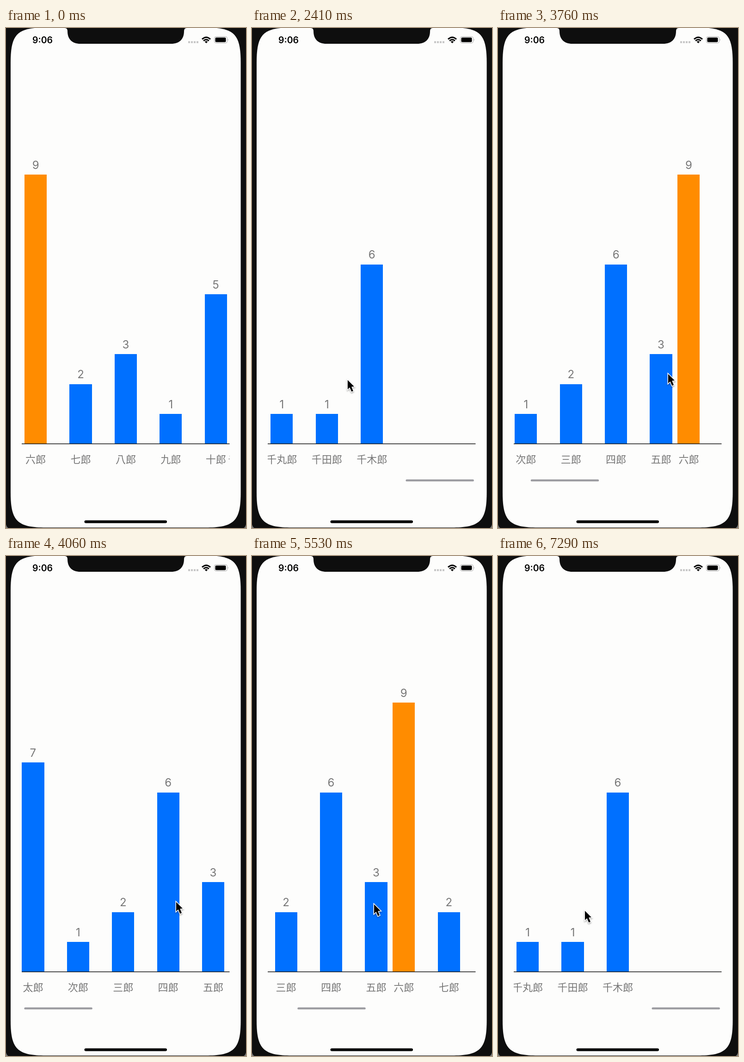
Animation, 519 px wide and 1078 px high, one loop 7340 ms. Source, as an HTML page:

```html
<!DOCTYPE html>
<html lang="ja">
<head>
<meta charset="utf-8">
<style>
  html, body { margin: 0; height: 100%; overflow: hidden; background: #0e0e0e; }
  svg { display: block; width: 519px; height: 1078px; }
  text { font-family: Inter, Roboto, sans-serif; }
  #chart text { fill: #777; font-size: 24px; text-anchor: middle; }
  #chart .name { font: 300 22px "Noto Sans CJK JP", "Noto Sans CJK", sans-serif; }
  #chart rect { shape-rendering: crispEdges; }
</style>
</head>
<body>
<svg viewBox="0 0 519 1078">
  <clipPath id="plot"><rect x="34" y="0" width="449.5" height="960"/></clipPath>
  <path d="M0 1070Q1 1075 5 1078H0ZM519 1070Q518 1075 514 1078H519Z" fill="#777"/>
  <path d="M10 75C10 13 24 -1 86 -1H431.6C493.6 -1 507.6 13 507.6 75V1001C507.6 1063 493.6 1077 431.6 1077H86C24 1077 10 1063 10 1001Z" fill="#fdfdfc"/>
  <path d="M127 0Q133 0 133 7C133 24 143 34 161 34H357C375 34 385 24 385 7Q385 0 391 0Z" fill="#0e0e0e"/>

  <text x="57" y="33" font-size="19.5" font-weight="600">9:06</text>
  <path d="M394 30.5H416" stroke="#c4c4c4" stroke-width="4" stroke-dasharray="4 2"/>
  <g fill="none" stroke="#000" stroke-width="3">
    <path d="M424 24.2Q433 15.8 442 24.2M427.2 27.6Q433 22.4 438.8 27.6"/>
    <path d="M429.7 29.6Q433 26.8 436.3 29.6L433 33Z" fill="#000" stroke="none"/>
  </g>
  <rect x="450.5" y="18.5" width="28" height="14" rx="4" fill="none" stroke="#aaa"/>
  <rect x="452.5" y="20.5" width="23" height="10" rx="2.3"/>
  <path d="M480 23.5Q482 25.5 480 27.5Z" fill="#aaa"/>

  <g clip-path="url(#plot)"><g id="chart"></g></g>
  <path d="M34 896.5H483.5" stroke="#111" stroke-width="1.5"/>
  <rect id="thumb" y="973.2" width="147.5" height="4.4" rx="2.2" fill="#9b9ba0"/>
  <rect x="169.5" y="1061.5" width="178.5" height="6" rx="3"/>
  <path id="cursor" d="M0 0V20L4.4 16L8.4 25.2L12 23.6L8.2 14.6L14 14Z"
    stroke="#fff" stroke-width="3" paint-order="stroke"
    style="filter:drop-shadow(0 2px 1.5px #0005)"/>
</svg>
<script>
const LOOP = 7340, PAGE = 449.5, PITCH = 97.4, BASE = 896.5, UNIT = 64.5;
const TAU = 85, DRAG = 185, MOVE = 250;
const names = [...'太次三四五六七八九十', '千丸', '千田', '千木'];
const counts = [7, 1, 2, 6, 3, 9, 2, 3, 1, 5, 1, 1, 6];
// pointer stops; a non-zero step starts a page swipe there
const stops = [
  { at: 1300, step: 0, x: 525, y: 800 },
  { at: 1587, step: 1, x: 385, y: 754 },
  { at: 2430, step: -1, x: 207, y: 759 },
  { at: 3520, step: -1, x: 183, y: 746 },
  { at: 5411, step: 1, x: 449, y: 751 },
  { at: 6284, step: 1, x: 328, y: 754 },
  { at: 7290, step: 0, x: 188, y: 765 }
];

const byId = id => document.getElementById(id);
const chart = byId('chart'), thumb = byId('thumb'), cursor = byId('cursor');
const clamp = v => Math.max(0, Math.min(1, v));
const mix = (a, b, k) => a + (b - a) * k;
const smooth = k => k * k * (3 - 2 * k);

const top9 = Math.max(...counts);
chart.innerHTML = counts.map((n, i) => {
  const x = 40 + Math.floor(i / 5) * PAGE + i % 5 * PITCH;
  const h = n * UNIT, mid = x + 24.1;
  return `<rect x="${x}" y="${BASE - h}" width="48.2" height="${h}" fill="${n === top9 ? '#ff8c00' : '#0070ff'}"/>
    <text x="${mid}" y="${BASE - h - 12.5}">${n}</text>
    <text class="name" x="${mid}" y="938">${names[i]}郎</text>`;
}).join('');

// critically damped approach from 0 to 1
function settle(t) {
  const u = Math.max(0, t) / TAU;
  return 1 - (1 + u) * Math.exp(-u);
}

// the pointer drags the page, rests, then moves to the next stop
function pointAt(t) {
  const i = stops.findLastIndex(s => s.at <= t);
  const a = stops[i], b = stops[i + 1] || a;
  const x = a.x - a.step * Math.min(DRAG, PAGE * settle(t - a.at));
  const k = smooth(clamp((t - b.at) / MOVE + 1));
  return b === a ? [a.x, a.y] : [mix(x, b.x, k), mix(a.y, b.y, k)];
}

function draw(t) {
  let page = 1, alpha = 0;
  for (const { at, step } of stops) {
    page += step * settle(t - at);
    if (step && t >= at) alpha = clamp((at + 1350 - t) / 250);
  }
  chart.setAttribute('transform', `translate(${-page * PAGE})`);
  thumb.setAttribute('x', 37.5 + page * 147.5);
  thumb.setAttribute('opacity', alpha);

  const shown = t >= stops[0].at;
  cursor.setAttribute('visibility', shown ? 'visible' : 'hidden');
  if (shown) cursor.setAttribute('transform', `translate(${pointAt(t)})`);
}

const begin = performance.now();
function tick() {
  draw((performance.now() - begin) % LOOP);
  requestAnimationFrame(tick);
}
tick();
</script>
</body>
</html>
```
